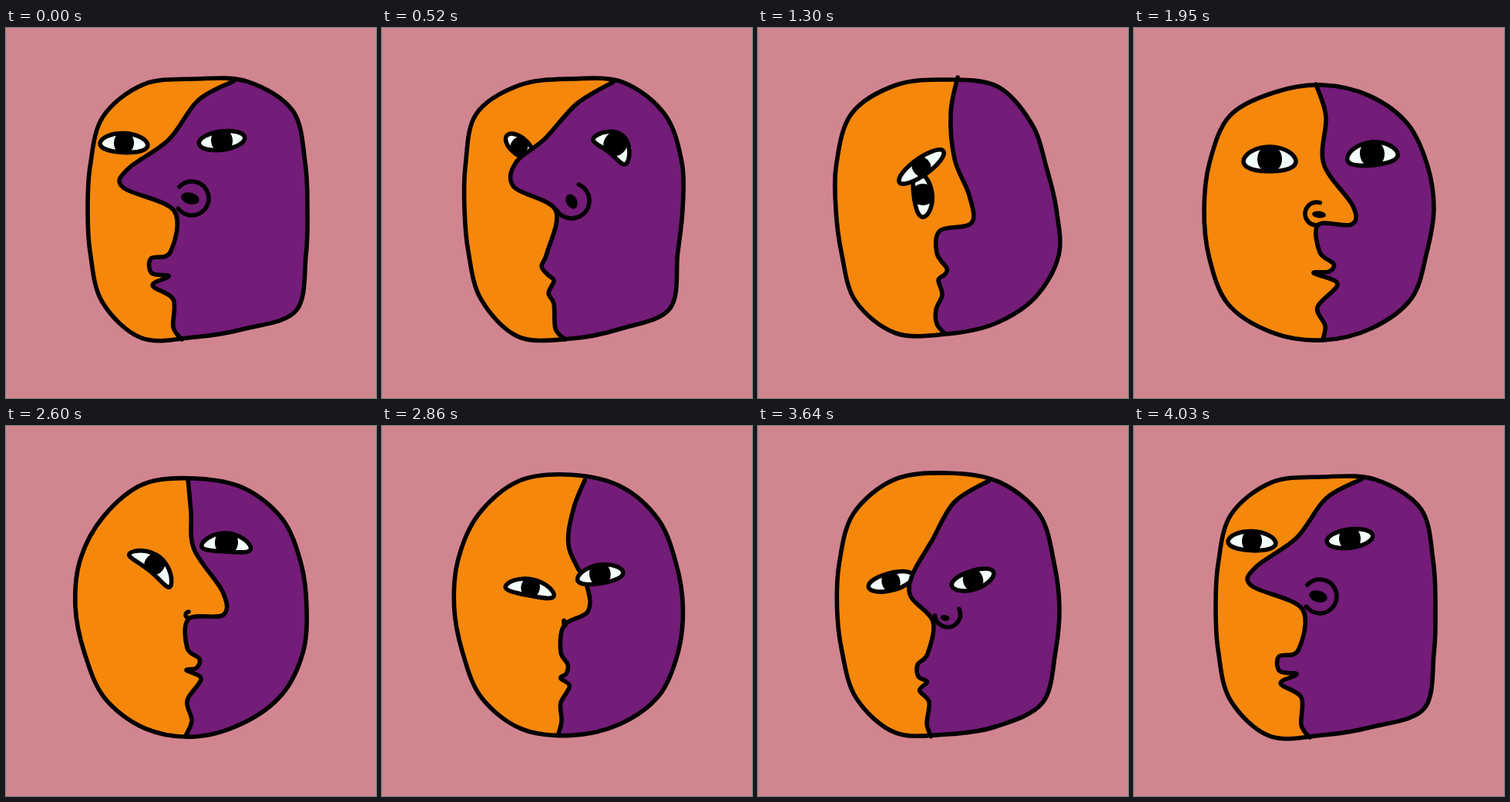
An HTML page with a canvas that plays this animation: 480 by 480 pixels, repeating every 4160 ms.

```html
<!DOCTYPE html>
<html lang="en">
<head>
<meta charset="utf-8">
<title>Two-tone face</title>
<style>
html, body { margin: 0; width: 100%; height: 100%; overflow: hidden; background: #d1858f; }
canvas { display: block; width: 100vw; height: 100vh; }
</style>
</head>
<body>
<canvas width="480" height="480"></canvas>
<script>
const ctx = document.querySelector('canvas').getContext('2d');
const STEP = 130, STEPS = 32, TAU = 2 * Math.PI;
const PINK = '#d1858f', ORANGE = '#f5870a', PURPLE = '#731c78', WHITE = '#f3fdfc';
const CENTER = [245, 235];

// head: radii around CENTER, clockwise from the right
// profile: key points x, y from crown over nose and lips to chin
// wing: x, y, radius, start angle, end angle
// hole: x, y, rx, ry, angle
// eyes: x, y, half length, half height, angle, bend, pupil radius
const front = {
  at: 0,
  head: [146, 156, 186, 168, 166, 181, 170, 147, 139, 147, 169, 175, 169, 179, 180, 155],
  profile: [295,69, 249,94, 211,145, 158,183, 152,207, 218,237, 213,291, 188,299, 189,318, 211,322, 190,334, 217,352, 217,388, 228,404],
  wing: [241, 221, 22, 2.5, -2.4],
  hole: [239, 221, 12, 7.5, 0.25],
  eyeL: [153, 149, 31, 12.5, 0.04, 2, 13],
  eyeR: [280, 146, 30, 12, -0.13, 0, 14]
};
const poses = [front, {
  at: 4,
  head: [145, 150, 182, 168, 168, 179, 165, 144, 138, 148, 174, 174, 169, 178, 173, 156],
  profile: [300,70, 253,98, 211,144, 174,174, 171,206, 225,236, 214,292, 207,309, 215,320, 223,328, 216,344, 223,358, 225,390, 237,404],
  wing: [246, 224, 23, 2.6, -1.15],
  hole: [246, 225, 10, 7, 1.1],
  eyeL: [178, 153, 21, 11, 0.7, 0, 11],
  eyeR: [303, 150, 27, 14, 0.66, 11, 15]
}, {
  at: 10,
  head: [142, 157, 162, 161, 162, 174, 168, 148, 144, 155, 175, 174, 168, 172, 156, 140],
  profile: [259,64, 250,110, 255,170, 274,217, 277,253, 236,263, 232,292, 245,312, 242,320, 234,327, 239,346, 231,365, 232,384, 243,397],
  wing: [250, 259, 0, 1.6, 4.7],
  hole: [250, 259, 0, 0, 0.5],
  eyeL: [214, 216, 29, 12, 1.45, 3, 14],
  eyeR: [212, 180, 35, 11, -0.62, 0, 12]
}, {
  at: 15,
  head: [144, 146, 163, 167, 170, 173, 174, 160, 154, 159, 171, 164, 161, 159, 156, 147],
  profile: [236,73, 249,115, 246,176, 284,231, 282,255, 239,255, 241,291, 259,306, 253,316, 233,318, 264,332, 238,362, 248,386, 245,404],
  wing: [237, 241, 15, 1.5, 5],
  hole: [240, 242, 9, 4.5, 0.1],
  eyeL: [176, 170, 34, 16, 0, 3, 16],
  eyeR: [309, 163, 33, 15, -0.1, 4, 16]
}, {
  at: 20,
  head: [145, 152, 160, 163, 168, 170, 166, 155, 155, 161, 167, 173, 167, 167, 161, 149],
  profile: [236,68, 240,112, 244,160, 281,215, 282,245, 237,250, 235,288, 251,302, 247,314, 234,317, 253,328, 235,356, 241,382, 233,402],
  wing: [237, 245, 4, 1.6, 4.7],
  hole: [236, 242, 2, 2, 0],
  eyeL: [193, 179, 34, 11, 0.68, 10, 13],
  eyeR: [286, 151, 32, 12, 0.06, 6, 15]
}, {
  at: 25,
  head: [146, 149, 165, 167, 164, 171, 163, 148, 146, 155, 174, 183, 179, 173, 160, 146],
  profile: [304,73, 260,104, 240,153, 244,200, 244,235, 236,270, 227,300, 226,320, 227,332, 228,342, 229,352, 227,364, 221,384, 221,401],
  wing: [251, 268, 11, 3.6, 1.5],
  hole: [246, 277, 0, 0, 0.2],
  eyeL: [192, 255, 29, 10, -0.55, -3, 11],
  eyeR: [278, 254, 27, 12, -0.5, -3, 12]
}, { ...front, at: STEPS - 1 }, { ...front, at: STEPS }];

function poseAt(step) {
  const i = poses.findIndex(p => p.at > step);
  const a = poses[i - 1], b = poses[i], k = (step - a.at) / (b.at - a.at), out = {};
  for (const key in a)
    if (key !== 'at') out[key] = a[key].map((v, j) => v + (b[key][j] - v) * k);
  return out;
}

// Catmull-Rom spline through points, drawn with Bezier segments
function spline(points, closed) {
  const n = points.length, path = new Path2D();
  const at = i => points[closed ? (i + n) % n : Math.min(Math.max(i, 0), n - 1)];
  path.moveTo(...points[0]);
  for (let i = 0; i < (closed ? n : n - 1); i++) {
    const [p, q, r, s] = [-1, 0, 1, 2].map(d => at(i + d));
    path.bezierCurveTo(q[0] + (r[0] - p[0]) / 6, q[1] + (r[1] - p[1]) / 6,
      r[0] - (s[0] - q[0]) / 6, r[1] - (s[1] - q[1]) / 6, r[0], r[1]);
  }
  if (closed) path.closePath();
  return path;
}

function fill(path, color) {
  ctx.fillStyle = color;
  ctx.fill(path);
}

function oval(x, y, rx, ry, angle = 0) {
  const path = new Path2D();
  path.ellipse(x, y, rx, ry, angle, 0, TAU);
  fill(path, '#000');
}

function eye([x, y, length, height, angle, bend, pupil]) {
  const lid = spline(Array.from({ length: 16 }, (_, i) => {
    const c = Math.cos(i * TAU / 16), s = Math.sin(i * TAU / 16);
    return [length * c, height * s + bend * c * c];
  }), true);
  ctx.save();
  ctx.translate(x, y);
  ctx.rotate(angle);
  fill(lid, WHITE);
  ctx.stroke(lid);
  ctx.clip(lid);
  oval(0, 0, pupil, pupil + 2);
  ctx.restore();
}

function draw(p) {
  const head = spline(p.head.map((r, i) => {
    const a = i * TAU / p.head.length;
    return [CENTER[0] + r * Math.cos(a), CENTER[1] + r * Math.sin(a)];
  }), true);
  const points = [];
  for (let i = 0; i < p.profile.length; i += 2) points.push(p.profile.slice(i, i + 2));
  const profile = spline(points);

  // Everything right of the profile, cut to the head
  const side = new Path2D(profile);
  side.lineTo(points[points.length - 1][0], 480);
  side.lineTo(480, 480);
  side.lineTo(480, 0);
  side.lineTo(points[0][0], 0);

  const wing = new Path2D(), [x, y, r, from, to] = p.wing;
  wing.arc(x, y, r, from, to, to < from);

  ctx.fillStyle = PINK;
  ctx.fillRect(0, 0, 480, 480);
  ctx.lineWidth = 5.6;
  ctx.lineJoin = ctx.lineCap = 'round';
  fill(head, ORANGE);
  eye(p.eyeL);
  ctx.save();
  ctx.clip(head);
  fill(side, PURPLE);
  ctx.restore();
  for (const path of [head, profile, wing]) ctx.stroke(path);
  oval(...p.hole);
  eye(p.eyeR);
}

function tick() {
  draw(poseAt(Math.floor(performance.now() / STEP) % STEPS));
  requestAnimationFrame(tick);
}
tick();
</script>
</body>
</html>
```
